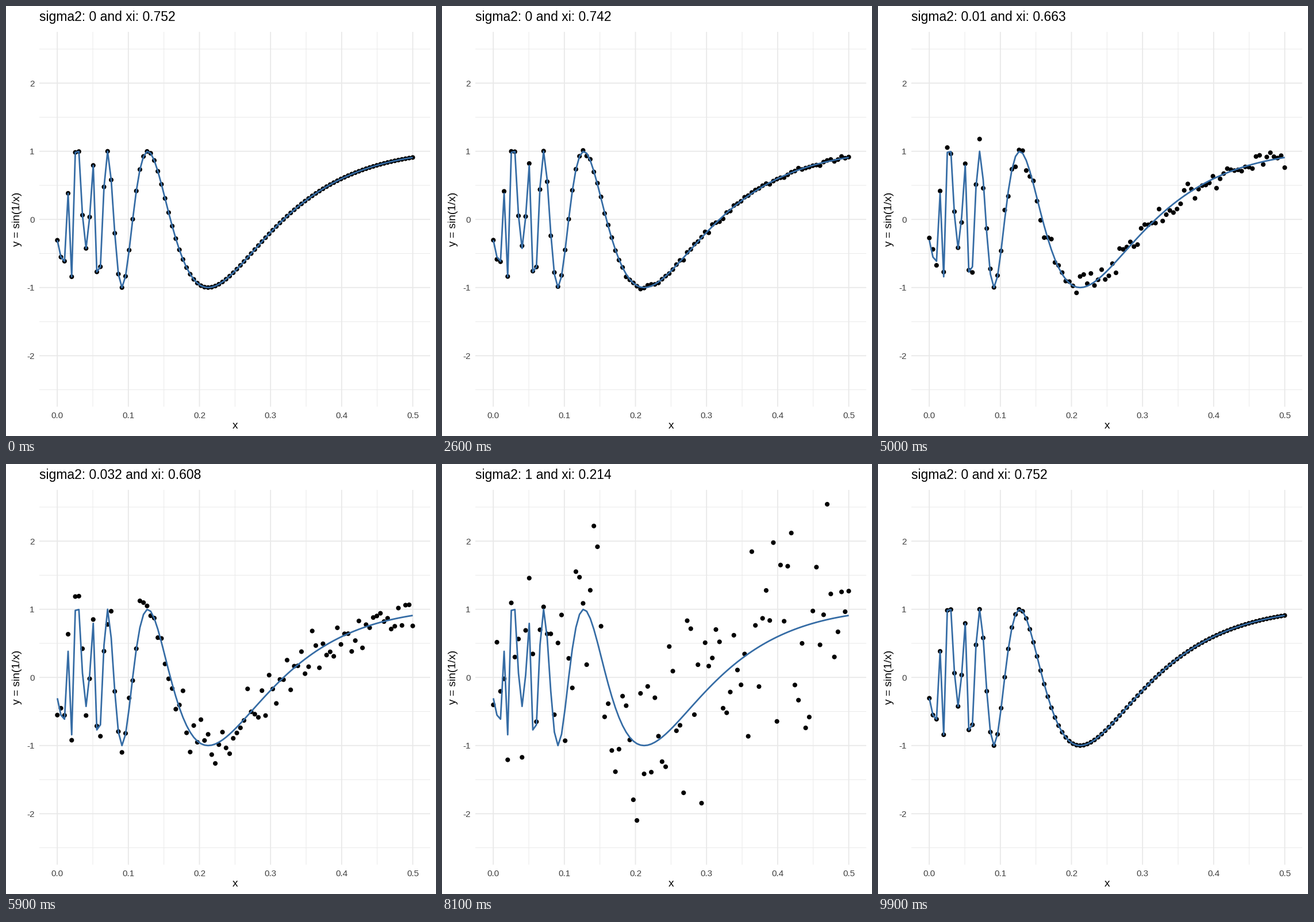
These frames come from a looping animation (748 px wide and 748 px high, 10000 ms). A matplotlib script:

```python
import numpy as np
import matplotlib.pyplot as plt
from matplotlib.animation import FuncAnimation

SIZE = 748
LEFT, RIGHT, TOP, BOTTOM = 58.4, 738.45, 45.3, 697.2
PX = 0.72  # points per pixel at 100 dpi
GRID, TICK, BLUE = "#e9e9e9", "#404040", "#356ca5"
plt.rcParams["font.family"] = "Liberation Sans"

# Noisy samples of sin(1/x), one row per noise level
N, LEVELS = 100, 12
x = np.linspace(0.0001, 0.5, N)
curve = np.sin(1 / x)
sigma2 = 10 ** ((np.arange(LEVELS) - 10) / 2)
xi = [0.752, 0.75, 0.748, 0.742, 0.72, 0.701,
      0.663, 0.608, 0.533, 0.421, 0.214, 0.037]

rng = np.random.default_rng(12)
noise = np.clip(rng.standard_normal((LEVELS, N)), -2.2, 2.2)
noise[0] = 0
y = curve + np.sqrt(sigma2)[:, None] * noise

# Each move lasts a few frames and is followed by one frame of rest
steps = np.array([8] * 5 + [6] + [7] * 6)
starts = np.cumsum(steps + 1) - (steps + 1)

fig = plt.figure(figsize=(SIZE / 100, SIZE / 100), dpi=100, facecolor="white")
ax = fig.add_axes([LEFT / SIZE, 1 - BOTTOM / SIZE,
                   (RIGHT - LEFT) / SIZE, (BOTTOM - TOP) / SIZE])
ax.axis("off")
pad = 0.05 * (x[-1] - x[0])
ax.set_xlim(x[0] - pad, x[-1] + pad)
ax.set_ylim(-2.75, 2.75)


def label(px, py, text, size, color="black", **kw):
    kw.setdefault("va", "baseline")
    return fig.text(px / SIZE, 1 - py / SIZE, text, fontsize=size * PX,
                    color=color, **kw)


def to_px(u, v):
    (x0, x1), (y0, y1) = ax.get_xlim(), ax.get_ylim()
    return (LEFT + (u - x0) / (x1 - x0) * (RIGHT - LEFT),
            BOTTOM - (v - y0) / (y1 - y0) * (BOTTOM - TOP))


def grid(xs, ys, width):
    style = dict(color=GRID, lw=width * PX, zorder=1, snap=False)
    for u in xs:
        ax.axvline(u, **style)
    for v in ys:
        ax.axhline(v, **style)


xticks, yticks = np.arange(6) / 10, np.arange(-2, 3)
grid(xticks[:-1] + 0.05, np.arange(-2.5, 3), 0.95)
grid(xticks, yticks, 1.85)
for u in xticks:
    label(to_px(u, 0)[0], 717, f"{u:.1f}", 15.3, TICK, ha="center")
for v in yticks:
    label(49.8, to_px(0, v)[1] + 5.5, str(v), 15.3, TICK, ha="right")
label(398.4, 735, "x", 19.1, ha="center")
label(24, 371, "y = sin(1/x)", 19.1, rotation=90, rotation_mode="anchor",
      ha="center")
title = label(LEFT, 26, "", 22.9)

# One size per dot keeps sub-pixel positions
dots = ax.scatter(x, y[0], s=np.full(N, (8.1 * PX) ** 2), c="black",
                  linewidths=0, zorder=2)
ax.plot(x, curve, color=BLUE, lw=2.75 * PX, zorder=3,
        solid_capstyle="butt", solid_joinstyle="round")


def update(frame):
    k = np.searchsorted(starts, frame, side="right") - 1
    t = min((frame - starts[k]) / steps[k], 1)
    nxt = (k + 1) % LEVELS
    dots.set_offsets(np.column_stack([x, (1 - t) * y[k] + t * y[nxt]]))
    near = nxt if t > 0.5 else k
    title.set_text(f"sigma2: {round(sigma2[near], 3):g} and xi: {xi[near]:g}")
    return dots, title


anim = FuncAnimation(fig, update, frames=100, interval=100, repeat=True)
plt.show()
```
